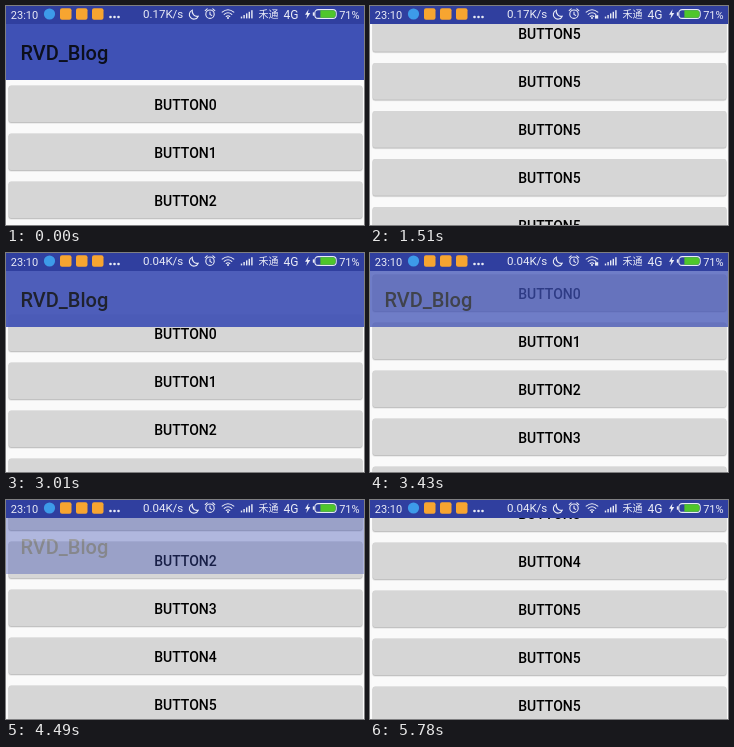
An HTML page that plays this animation: 358x219 px, repeating every 5.88 s.

```html
<!DOCTYPE html>
<html lang="en">
<head>
<meta charset="utf-8">
<title>Fading toolbar</title>
<style>
  html, body { margin: 0; width: 100%; height: 100%; overflow: hidden; background: #fafafa; }
  svg { display: block; width: 358px; height: 219px; font-family: Roboto, "Noto Sans CJK SC", "Noto Sans CJK", sans-serif; }
  .label { font-size: 14px; font-weight: 500; text-anchor: middle; fill: #000; }
  .title { font-size: 20px; font-weight: 500; fill: #0c0f1c; }
  .status { font-size: 11px; fill: #e9ebf6; }
  .line { fill: none; stroke: #e9ebf6; stroke-width: 1.1; stroke-linecap: round; }
</style>
</head>
<body>
<svg viewBox="0 0 358 219">
  <rect width="358" height="219" fill="#fafafa"/>
  <g id="list"></g>
  <circle id="glow" cx="179.5" cy="-452" r="540" fill="#3f51b5" opacity=".13"/>
  <g id="toolbar">
    <rect y="18" width="358" height="56" fill="#3f51b5"/>
    <text class="title" x="14.5" y="54">RVD_Blog</text>
  </g>

  <g class="status">
    <rect width="358" height="18" fill="#303f9f"/>
    <text x="4.8" y="12.6">23:10</text>
    <circle cx="43.5" cy="8" r="5.6" fill="#3d9be9"/>
    <g fill="#f7a530">
      <rect x="54" y="2.3" width="11.5" height="11.5" rx="2"/>
      <rect x="70" y="2.3" width="11.5" height="11.5" rx="2"/>
      <rect x="86" y="2.3" width="11.5" height="11.5" rx="2"/>
    </g>
    <circle cx="104.5" cy="11" r="1.3"/>
    <circle cx="108.5" cy="11" r="1.3"/>
    <circle cx="112.5" cy="11" r="1.3"/>
    <text id="speed" x="177.3" y="12.4" font-size="11.5" text-anchor="end"></text>

    <path class="line" d="M186.3 4.2A4.6 4.6 0 1 0 192.2 10.2A5 5 0 0 1 186.3 4.2Z"/>
    <g class="line">
      <circle cx="204" cy="8.2" r="4.2"/>
      <path d="M204 6v2.4l1.7 1M199.2 4.6l2-1.8M208.8 4.6l-2-1.8"/>
    </g>
    <path class="line" d="M216.2 6.2Q222 1.4 227.8 6.2M218.2 8.4Q222 5.1 225.8 8.4M220.2 10.5Q222 9 223.8 10.5"/>
    <circle cx="222" cy="12" r="1"/>
    <path id="traffic" d="M225 9.2h3.2v3.4h-3.2z"/>
    <g id="signal"></g>
    <text x="252.5" y="12.4" font-size="10">禾通</text>
    <text x="277.6" y="12.6" font-size="12">4G</text>
    <path d="M302.6 3.2L299 8.8h2.2l-.9 4.2l4-6h-2.4z"/>
    <rect class="line" x="308.8" y="3.6" width="21.4" height="8.8" rx="3.4"/>
    <rect x="306.8" y="6.2" width="1.4" height="3.6" rx=".6"/>
    <path d="M314.4 4.2h12.2a3 3 0 0 1 3 3v1.6a3 3 0 0 1-3 3h-12.2z" fill="#4fc62b"/>
    <text x="333.2" y="12.5">71%</text>
  </g>
</svg>

<script>
const LOOP = 5880, PITCH = 48, ROWS = 15, FADE = 220;

// [start ms, scroll px]
const SCROLL = [
  [0, 0], [440, 301], [650, 400.5], [1080, 404.5], [1510, 406.5], [1720, 0],
  [2790, 3], [3010, 18], [3220, 38], [3430, 58], [3650, 72], [3860, 85],
  [4070, 98], [4280, 112], [4490, 134], [4710, 159], [4920, 177],
  [5130, 194.5], [5350, 211], [5570, 226], [5780, 229]
];
const TRAFFIC = [[0, 0], [220, 1], [2360, 0], [3220, 1], [4280, 0]];
const SPEED = [[0, "0.17K/s"], [2580, "0.04K/s"]];
const GLOW = [[0, 0], [1720, 1], [1930, 0]];

const $ = id => document.getElementById(id);
const at = (steps, t) => steps.filter(s => s[0] <= t).pop()[1];
const show = (id, on) => $(id).setAttribute("visibility", on ? "visible" : "hidden");

function row(i) {
  const y = 79.5 + i * PITCH;
  return `<rect x="2" y="${y}" width="355" height="38.3" rx="3" fill="#e8e8e8"/>
    <rect x="2.6" y="${y + 0.5}" width="353.8" height="36.9" rx="2.4" fill="#c2c2c2"/>
    <rect x="3" y="${y}" width="353" height="36.5" rx="2" fill="#d6d6d6"/>
    <text class="label" x="179.5" y="${y + 24}">BUTTON${Math.min(i, 5)}</text>`;
}

function bar(i) {
  const h = 1.8 + i * 1.6;
  return `<rect x="${234.8 + i * 2.6}" y="${12.4 - h}" width="1.4" height="${h}"/>`;
}

const repeat = (n, draw) => Array.from({ length: n }, (_, i) => draw(i)).join("");
$("list").innerHTML = repeat(ROWS, row);
$("signal").innerHTML = repeat(5, bar);

function draw(t) {
  const y = at(SCROLL, t);
  $("list").setAttribute("transform", `translate(0 ${-y})`);
  $("toolbar").setAttribute("opacity", Math.max(0, 1 - y / FADE));
  $("speed").textContent = at(SPEED, t);
  show("traffic", at(TRAFFIC, t));
  show("glow", at(GLOW, t));
}

const start = performance.now();
function tick() {
  draw((performance.now() - start) % LOOP);
  requestAnimationFrame(tick);
}
tick();
</script>
</body>
</html>
```
